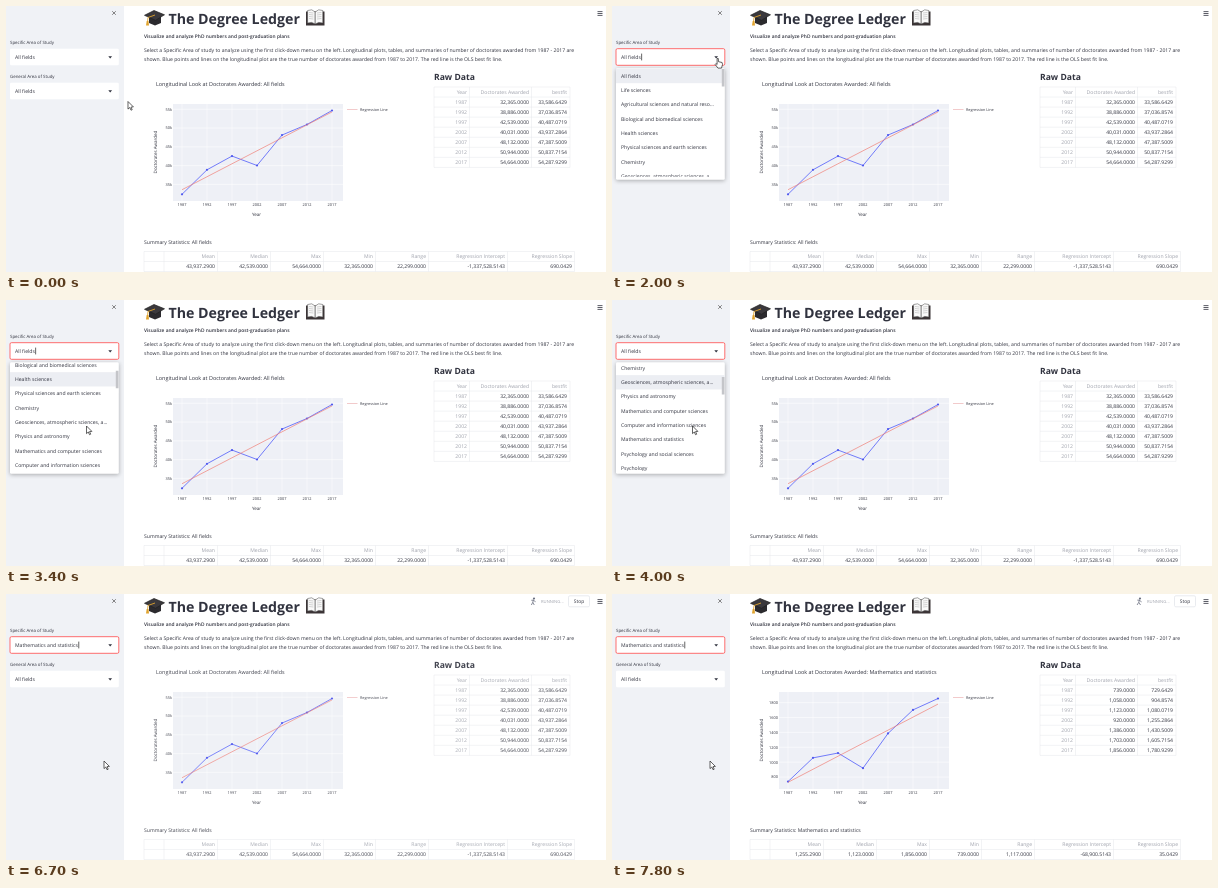
Recreate the animation shown at these times as an HTML page with a canvas. Size 600 by 266 pixels, loop 8 s.

```html
<!DOCTYPE html>
<html lang="en">
<head>
<meta charset="utf-8">
<title>Dashboard</title>
<style>
html, body { margin: 0; overflow: hidden; background: #fff; }
canvas { display: block; }
</style>
</head>
<body>
<canvas id="stage" width="600" height="266"></canvas>
<script>
const ctx = document.getElementById('stage').getContext('2d');
ctx.textRendering = 'geometricPrecision';
const LOOP = 8000, OPEN = 2000, PICK = 5400, RUN = 5900, REFRESH = 7300;
const INK = '#31333f', MUTED = '#a0a3ad', RED = '#ff4b4b', BORDER = '#e4e6eb';

const years = [1987, 1992, 1997, 2002, 2007, 2012, 2017];
const before = {
  name: 'All fields', ticks: [35, 40, 45, 50, 55].map(k => [k * 1000, k + 'k']),
  awarded: [32365, 38886, 42539, 40031, 48132, 50944, 54664], fit0: 33586.6429, slope: 690.0429,
  stats: ['43,937.2900', '42,539.0000', '54,664.0000', '32,365.0000', '22,299.0000', '-1,337,528.5143', '690.0429']
};
const after = {
  name: 'Mathematics and statistics', ticks: [8, 10, 12, 14, 16, 18].map(k => [k * 100, k + '00']),
  awarded: [739, 1058, 1123, 920, 1386, 1703, 1856], fit0: 729.6429, slope: 35.0429,
  stats: ['1,255.2900', '1,123.0000', '1,856.0000', '739.0000', '1,117.0000', '-68,900.5143', '35.0429']
};
const options = ['All fields', 'Life sciences', 'Agricultural sciences and natural reso...',
  'Biological and biomedical sciences', 'Health sciences', 'Physical sciences and earth sciences',
  'Chemistry', 'Geosciences, atmospheric sciences, a...', 'Physics and astronomy',
  'Mathematics and computer sciences', 'Computer and information sciences',
  'Mathematics and statistics', 'Psychology and social sciences', 'Psychology'];

// [time, x, y] and [time, offset] keyframes
const pointerPath = [[0, 122, 95.5], [400, 112.5, 52], [800, 112.5, 52], [900, 104, 52], [1200, 104, 52],
  [1500, 103.5, 52.5], [2050, 103.5, 52.5], [2800, 80.5, 126], [4800, 80.5, 126], [5200, 71, 137.5],
  [5500, 71, 137.5], [5600, 98, 167], [LOOP, 98, 167]];
const scrollPath = [[0, 0], [3000, 0], [3350, 48], [3600, 48], [3950, 88], [LOOP, 88]];

function sample(path, t) {
  const i = Math.max(1, path.findIndex(k => k[0] > t));
  const a = path[i - 1], b = path[i], u = (t - a[0]) / (b[0] - a[0]);
  const e = u * u * (3 - 2 * u);
  return a.slice(1).map((v, n) => v + (b[n + 1] - v) * e);
}

function text(s, x, y, size = 5.1, { color = INK, align = 'left', weight = 400 } = {}) {
  ctx.font = `${weight} ${size}px "Open Sans", "Noto Sans", sans-serif`;
  ctx.fillStyle = color;
  ctx.textAlign = align;
  ctx.fillText(s, x, y + size * 0.36);
}
function line(points, color, width = 0.5) {
  ctx.beginPath();
  points.forEach(p => ctx.lineTo(...p));
  ctx.strokeStyle = color;
  ctx.lineWidth = width;
  ctx.stroke();
}
function shape(points, fill, stroke, width = 0.7) {
  ctx.beginPath();
  points.forEach(p => ctx.lineTo(...p));
  ctx.closePath();
  ctx.fillStyle = fill;
  ctx.fill();
  if (stroke) { ctx.strokeStyle = stroke; ctx.lineWidth = width; ctx.stroke(); }
}
function box(x, y, w, h, fill, stroke, radius = 1.4) {
  ctx.beginPath();
  ctx.roundRect(x, y, w, h, radius);
  ctx.fillStyle = fill;
  ctx.fill();
  if (stroke) { ctx.strokeStyle = stroke; ctx.lineWidth = 0.8; ctx.stroke(); }
}
function disc(x, y, r, color) {
  ctx.beginPath();
  ctx.arc(x, y, r, 0, 7);
  ctx.fillStyle = color;
  ctx.fill();
}
const number = v => v.toLocaleString('en-US', { minimumFractionDigits: 4, maximumFractionDigits: 4 });
const fitted = (d, i) => d.fit0 + i * 5 * d.slope;

function heading() {
  shape([[143, 10], [155, 10], [155, 17], [149, 19.5], [143, 17]], '#2b2a2e');
  shape([[138.5, 9.3], [148, 4.5], [158.5, 8.8], [149.5, 14.3]], '#3a383c', '#222');
  line([[149, 9], [142, 11.5], [141.5, 16]], '#e0a32e', 0.9);
  shape([[140.7, 15], [142.5, 15], [143, 19.5], [140, 19.5]], '#e0a32e');
  text('The Degree Ledger', 162.5, 12.6, 14.2, { weight: 700 });
  shape([[300, 5.5], [318.5, 5.5], [318.5, 19.5], [300, 19.5]], '#3b3436');
  for (const side of [-1, 1]) {
    const at = (dx, y) => [309.2 + side * dx, y];
    shape([at(0, 6), at(3.5, 3.8), at(7.6, 4.5), at(7.6, 17), at(3.5, 16.4), at(0, 18)], '#fafafa', '#444', 0.5);
    for (let y = 7; y < 15; y += 2) line([at(1.8, y), at(6.2, y - 0.5)], '#aaa', 0.5);
  }
  text('Visualize and analyze PhD numbers and post-graduation plans', 138, 29.8, 4.85, { weight: 600 });
  text('Select a Specific Area of study to analyze using the first click-down menu on the left. Longitudinal plots, tables, and summaries of number of doctorates awarded from 1987 - 2017 are', 138, 44);
  text('shown. Blue points and lines on the longitudinal plot are the true number of doctorates awarded from 1987 to 2017. The red line is the OLS best fit line.', 138, 52.8);
  for (const y of [5.6, 7.5, 9.4]) line([[591.5, y], [596.5, y]], INK, 0.8);
}

function chart(d) {
  text('Longitudinal Look at Doctorates Awarded: ' + d.name, 150, 78.3, 5.45);
  const low = Math.min(d.fit0, ...d.awarded), high = Math.max(...d.awarded);
  const px = i => 176 + i * 25, py = v => 188.3 - (v - low) / (high - low) * 83.8;
  ctx.fillStyle = '#eef0f6';
  ctx.fillRect(167, 98, 170, 97);
  d.ticks.forEach(([v, label]) => {
    line([[167, py(v)], [337, py(v)]], '#fff');
    text(label, 166, py(v), 3.9, { align: 'right' });
  });
  years.forEach((year, i) => {
    line([[px(i), 98], [px(i), 195]], '#fff');
    text(year, px(i), 198.5, 3.9, { align: 'center' });
  });
  const points = d.awarded.map((v, i) => [px(i), py(v)]);
  line(points, '#636efa', 0.9);
  points.forEach(p => disc(...p, 1.1, '#4f58ee'));
  line([[px(0), py(d.fit0)], [px(6), py(fitted(d, 6))]], '#ef8078', 0.7);
  line([[341, 103.5], [351.5, 103.5]], '#e9a6a8', 0.6);
  text('Regression Line', 354, 103.5, 3.8);
  text('Year', 250.5, 208, 4.5, { align: 'center' });
  ctx.save();
  ctx.translate(149, 146);
  ctx.rotate(-Math.PI / 2);
  text('Doctorates Awarded', 0, 0, 4.5, { align: 'center' });
  ctx.restore();
}

function tables(d) {
  const right = { align: 'right' }, head = { align: 'right', color: MUTED };
  text('Raw Data', 428, 70.8, 8.6, { weight: 700 });
  const edges = [461, 523, 561];
  ['Year', 'Doctorates Awarded', 'bestfit'].forEach((s, i) => text(s, edges[i], 86.2, 5.1, head));
  for (let r = 0; r <= 8; r++) line([[428, 81 + r * 10.05], [564, 81 + r * 10.05]], BORDER);
  for (const x of [428, 463.5, 525.5, 564]) line([[x, 81], [x, 161.4]], BORDER);
  years.forEach((year, i) => {
    const y = 96.2 + i * 10.05;
    text(year, edges[0], y, 5.1, head);
    text(number(d.awarded[i]), edges[1], y, 5.1, right);
    text(number(fitted(d, i)), edges[2], y, 5.1, right);
  });

  text('Summary Statistics: ' + d.name, 138, 235.8);
  const columns = [209, 262, 315, 367, 420, 499, 566];
  for (const y of [245.5, 255.5, 265.5]) line([[138, y], [568.5, y]], BORDER);
  for (const x of [138, 158, ...columns.map(c => c + 2.5)]) line([[x, 245.5], [x, 265.5]], BORDER);
  ['Mean', 'Median', 'Max', 'Min', 'Range', 'Regression Intercept', 'Regression Slope'].forEach((s, i) => {
    text(s, columns[i], 250.6, 5.1, head);
    text(d.stats[i], columns[i], 260.6, 5.1, right);
  });
}

function select(label, value, y, focused, caret) {
  text(label, 4, y - 15, 4.4);
  box(4, y - 8.3, 108.8, 16.6, '#fff', focused ? RED : null);
  text(value, 9, y);
  if (caret) {
    const x = 9.8 + ctx.measureText(value).width;
    line([[x, y - 3.4], [x, y + 3.4]], '#222', 0.7);
  }
  shape([[102.3, y - 0.7], [106.1, y - 0.7], [104.2, y + 1.4]], INK);
}

function dropdown(t, pointerY) {
  const top = 62.3, height = 111.5, pitch = 14.33;
  const [scroll] = sample(scrollPath, t);
  // the highlight only catches up once scrolling rests
  const settled = t < 3450 ? 0 : t < 4050 ? 48 : 88;
  const hover = pointerY < top ? 0 : Math.floor((pointerY + 1.5 - 63 + settled) / pitch);
  ctx.save();
  ctx.shadowColor = 'rgba(0,0,0,.3)';
  ctx.shadowBlur = 4;
  ctx.shadowOffsetY = 1;
  box(4, top, 108.8, height, '#fff');
  ctx.restore();
  ctx.save();
  ctx.beginPath();
  ctx.rect(4, top, 108.8, height - 3);
  ctx.clip();
  options.forEach((name, i) => {
    const y = 70 + i * pitch - scroll;
    if (i === hover) {
      ctx.fillStyle = '#eceef3';
      ctx.fillRect(4, y - pitch / 2, 108.8, pitch);
    }
    text(name, 9, y);
  });
  box(109.8, 63 + scroll * 0.16, 2.8, 17.5, '#c4c5c9', null, 0);
  ctx.restore();
}

function runner(t) {
  const s = Math.sin(t / 90) * 1.8, color = '#6b7080';
  disc(528, 4.5, 1.1, color);
  line([[527.5, 5.6], [526.8, 8.3], [526.8 + s, 11]], color, 0.8);
  line([[526.8, 8.3], [526.8 - s, 11]], color, 0.8);
  line([[525.3, 7 + s / 2], [527.3, 6.2], [529.6, 7 - s / 2]], color, 0.8);
  text('RUNNING...', 535, 7.3, 4.2, { color: MUTED });
  box(562.5, 1.8, 21, 11, '#fff', BORDER);
  text('Stop', 573, 7.2, 4.9, { align: 'center' });
}

function pointer(x, y, hand) {
  const arrow = [[0, 0], [0, 7.6], [1.8, 6], [3, 8.7], [4.2, 8.2], [3, 5.6], [5.4, 5.4]];
  const finger = [[1.6, 0], [2.8, 0], [3, 3.2], [6.6, 4], [7, 6], [6, 9.6], [2.4, 9.6], [-0.4, 5.8], [0.4, 5], [1.6, 6]];
  shape((hand ? finger : arrow).map(([dx, dy]) => [x + dx, y + dy]), '#fff', '#222');
}

function draw(t) {
  const picked = t >= PICK, open = t >= OPEN && !picked;
  const caret = t >= OPEN && (t - (picked ? PICK : OPEN)) % 1060 < 530;
  const [x, y] = sample(pointerPath, t);
  ctx.fillStyle = '#fff';
  ctx.fillRect(0, 0, 600, 266);
  heading();

  const data = t < REFRESH ? before : after;
  const stale = data === before ? Math.max(0, (t - RUN - 500) / 1000) : 0;
  ctx.globalAlpha = 1 - 0.67 * stale ** 1.7;
  chart(data);
  tables(data);
  ctx.globalAlpha = 1;
  if (t >= RUN) runner(t);

  ctx.fillStyle = '#f0f2f6';
  ctx.fillRect(0, 0, 118, 266);
  line([[106.2, 5.2], [109.8, 8.8]], '#555', 0.7);
  line([[109.8, 5.2], [106.2, 8.8]], '#555', 0.7);
  select('Specific Area of Study', picked ? after.name : before.name, 51, t >= OPEN, caret);
  select('General Area of Study', 'All fields', 85, false, false);
  if (open) dropdown(t, y);
  pointer(x, y, t >= 850 && y < 60);
}

function frame(now) {
  draw(now % LOOP);
  requestAnimationFrame(frame);
}
requestAnimationFrame(frame);
</script>
</body>
</html>
```
